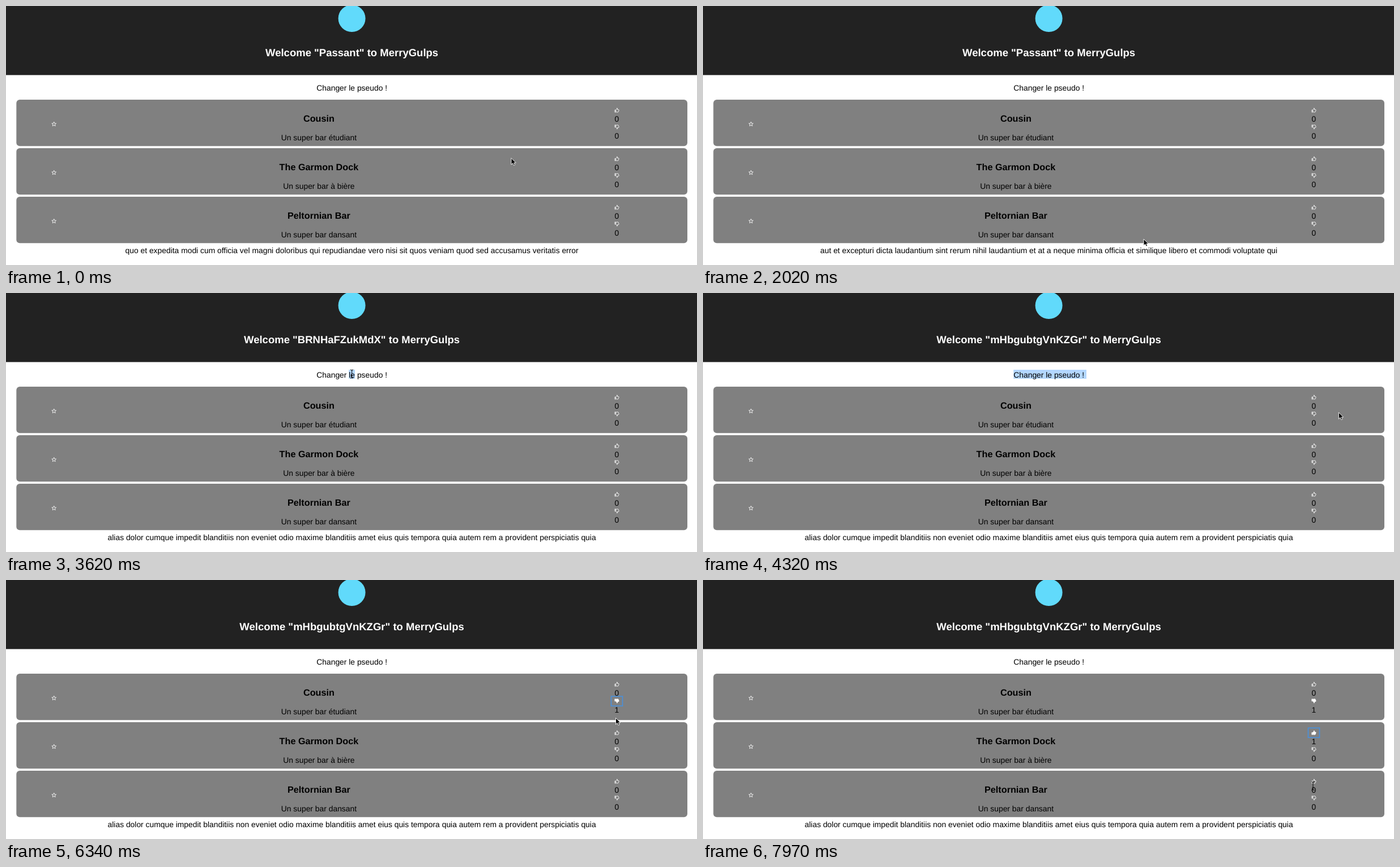
Animation, 1220 px wide and 459 px high, one loop 8000 ms. Source, as an HTML page:

```html
<!DOCTYPE html>
<html lang="fr">
<head>
<meta charset="utf-8">
<style>
  html, body { margin: 0; width: 100%; height: 100%; overflow: hidden; background: #fff; }
  svg { display: block; width: 1220px; height: 459px; }
  text {
    font: 13.87px "Liberation Sans", Arial, sans-serif;
    text-anchor: middle;
    text-rendering: geometricPrecision;
  }
  text.title { font-size: 18.5px; font-weight: bold; fill: #fff; }
  text.name { font-size: 16.22px; font-weight: bold; }
  .icon { fill: none; stroke: #fff; stroke-width: .85; stroke-linejoin: round; }
</style>
</head>
<body>
<svg id="stage" viewBox="0 0 1220 459"></svg>
<script>
const LOOP = 8000, GLIDE = 550;
const MID = 610.6, CARD_MID = 552.4, VOTE_X = 1078.4;
const stage = document.getElementById('stage');

function set(el, attrs) {
  for (const k in attrs) el.setAttribute(k, attrs[k]);
}
function add(tag, attrs, text = '') {
  const el = document.createElementNS('http://www.w3.org/2000/svg', tag);
  set(el, attrs);
  el.textContent = text;
  return stage.appendChild(el);
}
const label = (x, y, text, cls = '') => add('text', { x, y, class: cls }, text);
const show = (el, on) => set(el, { visibility: on ? 'visible' : 'hidden' });
const setText = (el, s) => { if (el.textContent !== s) el.textContent = s; };

// Header
add('rect', { width: 1220, height: 122.4, fill: '#222' });
add('circle', { cx: MID, cy: 22, r: 24, fill: '#61dafb' });
const title = label(MID, 88.5, '', 'title');
const mark = add('rect', { y: 136, height: 16, fill: '#b3d7ff' });
const change = label(MID + 2, 149.5, 'Changer le pseudo !\u00a0');

// Cards
const THUMB = 'M.4 3.8H2V7.6H.4ZM2 4 3.8 2 4.2.4Q5.6.3 5 3H7.1Q8 3.3 7.5 4.5L6.8 6.7Q6.5 7.6 5.6 7.6H4L2 7Z';
const star = Array.from({ length: 10 }, (_, i) => {
  const r = i % 2 ? 1.8 : 4.1, a = i * Math.PI / 5;
  return [r * Math.sin(a), -r * Math.cos(a)];
}).join(' ');

function vote(y, side) {
  const transform = `translate(1074.5 ${y - 4 * side}) scale(1 ${side})`;
  return {
    y,
    icon: add('path', { d: THUMB, class: 'icon', transform }),
    count: label(VOTE_X, y + 20.5, '0')
  };
}

const cards = [
  ['Cousin', 'Un super bar étudiant'],
  ['The Garmon Dock', 'Un super bar à bière'],
  ['Peltornian Bar', 'Un super bar dansant']
].map(([name, about], i) => {
  const y = 166 + 86 * i;
  add('rect', { x: 18.3, y, width: 1184.7, height: 82.3, rx: 6, fill: '#808080' });
  add('polygon', { points: star, class: 'icon', transform: `translate(84.7 ${y + 43.4})` });
  label(CARD_MID, y + 38.6, name, 'name');
  label(CARD_MID, y + 72, about);
  return { up: vote(y + 18.5, 1), down: vote(y + 48.5, -1) };
});
const [first, second, third] = cards;

const footer = label(MID, 437.8);
const focus = add('rect', { x: 1068.5, width: 20, height: 17, fill: 'none', stroke: '#4a90d9', 'stroke-width': 1.7 });

// Pointers
const arrow = add('path', { d: 'M0 0V11.6L2.7 9 4.5 13 6.6 12 4.8 8.4H8.3Z', fill: '#000', stroke: '#fff', 'stroke-width': .9 });
const beam = add('path', { d: 'M-2.5-7.5Q0-7.5 0-5V5Q0 7.5-2.5 7.5M2.5-7.5Q0-7.5 0-5M2.5 7.5Q0 7.5 0 5M-1.5 3H1.5', fill: 'none', stroke: '#111', 'stroke-width': 1.1 });

// Timelines: each entry starts with its time
const nicks = [[0, 'Passant'], [3480, 'BRNHaFZukMdX'], [3740, 'mHbgubtgVnKZGr']];
const quotes = [
  [0, 'quo et expedita modi cum officia vel magni doloribus qui repudiandae vero nisi sit quos veniam quod sed accusamus veritatis error'],
  [450, 'aut et excepturi dicta laudantium sint rerum nihil laudantium et at a neque minima officia et similique libero et commodi voluptate qui'],
  [2250, 'alias dolor cumque impedit blanditiis non eveniet odio maxime blanditiis amet eius quis tempora quia autem rem a provident perspiciatis quia']
];
const marks = [[0, ''], [3560, 'le'], [3740, change.textContent], [5650, '']];
const clicks = [[4900, first.up, 0], [5650, null], [5960, first.down, 1], [6760, second.up, 1]];
const moves = [
  [0, 892, 269.5], [1050, 778, 413], [2700, MID, 143.5], [3760, 1131, 217],
  [4180, VOTE_X, first.up.y], [5000, VOTE_X, first.down.y + 7], [5700, VOTE_X, first.down.y],
  [6050, 1075, second.up.y - 1], [7200, 1077, third.up.y + 8.5]
];

const latest = (list, t) => list.findLast(e => e[0] <= t);
const at = (list, t) => (latest(list, t) || [])[1];

function pointer(t) {
  const to = latest(moves, t), from = moves[moves.indexOf(to) - 1] || to;
  const u = Math.min(1, (t - to[0]) / GLIDE), e = u * u * (3 - 2 * u);
  return [1, 2].map(k => from[k] + (to[k] - from[k]) * e);
}

function overText(x, y) {
  if (Math.abs(x - MID) < 63 && Math.abs(y - 144) < 8) return true;
  return Math.abs(x - VOTE_X) < 4.5 &&
    cards.some(c => [c.up, c.down].some(v => Math.abs(y - v.y - 15) < 8.5));
}

function draw(t) {
  setText(title, `Welcome "${at(nicks, t)}" to MerryGulps`);
  setText(footer, at(quotes, t));

  const picked = at(marks, t);
  show(mark, picked);
  if (picked) {
    const from = change.textContent.indexOf(picked);
    set(mark, {
      x: change.getStartPositionOfChar(from).x,
      width: change.getSubStringLength(from, picked.length)
    });
  }

  for (const [start, v, n] of clicks) {
    if (!v) continue;
    const on = n && t >= start;
    v.icon.style.fill = on ? '#fff' : 'none';
    setText(v.count, on ? '1' : '0');
  }
  const target = at(clicks, t);
  show(focus, target);
  if (target) set(focus, { y: target.y - 8.3 });

  const [x, y] = pointer(t), text = overText(x, y);
  for (const el of [arrow, beam]) set(el, { transform: `translate(${x} ${y})` });
  show(arrow, !text);
  show(beam, text);
}

function tick() {
  draw(performance.now() % LOOP);
  requestAnimationFrame(tick);
}
tick();
</script>
</body>
</html>
```
